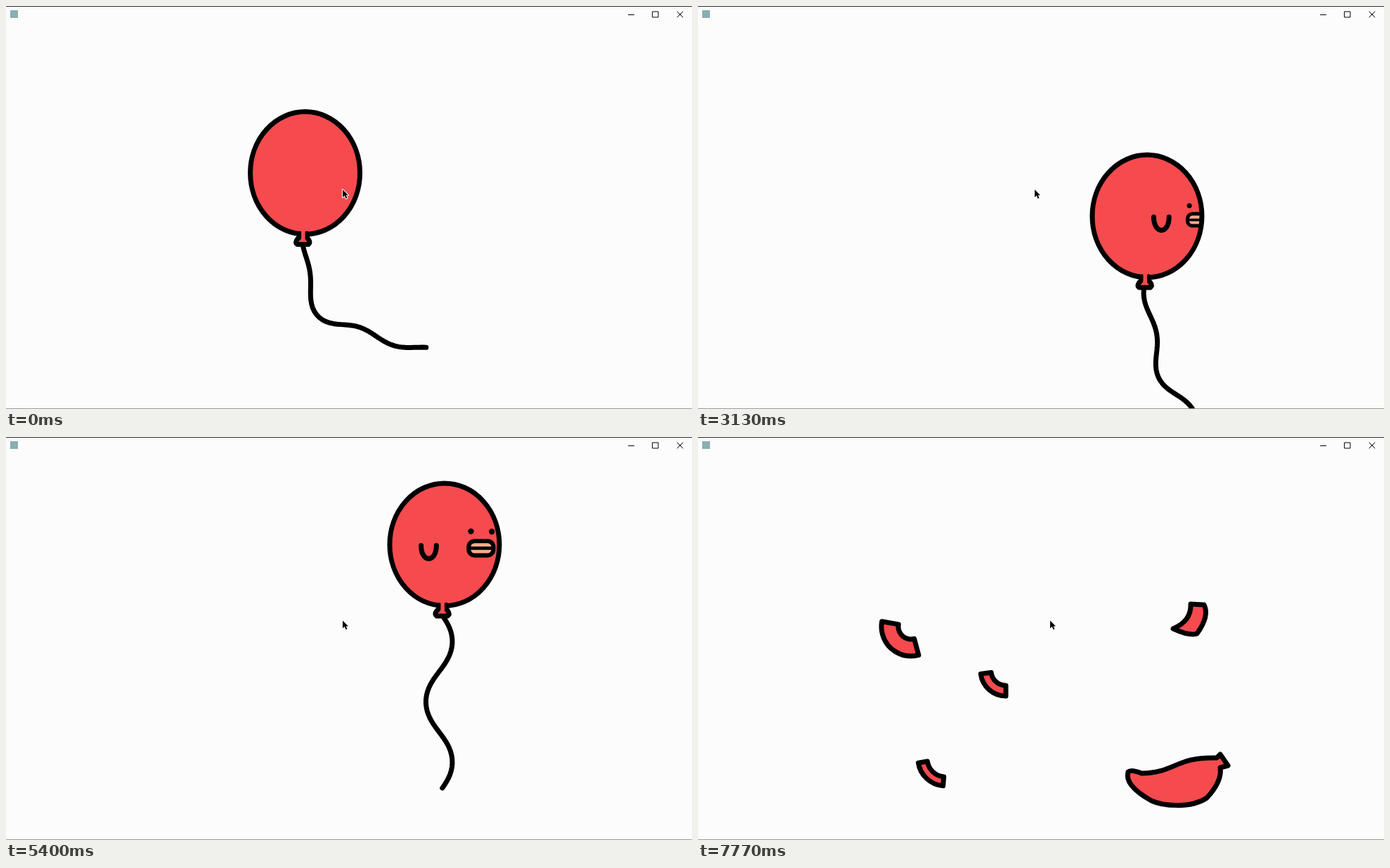
Recreate the animation shown at these times as an HTML page with a canvas. Size 976 by 574 pixels, loop 7.8 s.

```html
<!DOCTYPE html>
<html lang="en">
<head>
<meta charset="utf-8">
<title>Balloon</title>
<style>
html, body { margin: 0; width: 976px; height: 574px; overflow: hidden; background: #fcfcfc; }
canvas { display: block; }
</style>
</head>
<body>
<canvas id="stage" width="976" height="574"></canvas>
<script>
const ctx = document.getElementById('stage').getContext('2d');
const LOOP = 7800, POP = 7430, END = 7770;
const RED = '#f54b4f', PEACH = '#f8ad8c';
const STALLS = [[2430, 2570], [5730, 5830], [7330, 7430]];
const STRING_LENGTH = 268, STRING_STEPS = 48, WING = 71;

// String poses: the heading, in degrees from straight down, bends and waves along the length
const TRAIL = { x: -3, bend: 74, amp: 18, waves: 2.27, phase: 0.136 };
const HANG = { x: -6, bend: -3, amp: 30, waves: 1.96, phase: 0.43 };
const SWAY = { x: -1, bend: 0, amp: 37, waves: 1.4, phase: -0.06 };
const SWAY_BACK = { ...SWAY, x: -6, amp: -37 };

const KEYS = [
  { t: 0, dist: 0, turn: 180, pose: TRAIL },
  { t: 1070, dist: 69, turn: 33, pose: SWAY_BACK },
  { t: 2230, dist: 153, turn: -180, pose: TRAIL },
  { t: 3930, dist: 267, turn: -360, pose: HANG },
  { t: 5400, dist: 359.5, turn: -675, pose: SWAY },
  { t: 6470, dist: 436, turn: -720, pose: HANG },
  { t: POP, dist: 499, turn: -850, pose: SWAY_BACK }
];

const KNOT = new Path2D('M-8,87Q-7,92 -11,95Q-15,100 -11,102.5H4.5Q8,100 4.5,95Q1,92 2.5,87');
const ARROW = new Path2D('M0,0V11L2.6,8.6L4.6,12.8L6.5,12L4.6,8H8Z');

const SCRAPS = [
  { x: 303, y: 270, path: band(18, 42, 75, 190) },
  { x: 438, y: 333, path: band(21, 36, 90, 173) },
  { x: 352, y: 458, path: band(26, 39, 95, 171) },
  { x: 700, y: 260, path: new Path2D('M1,-22L20,-21Q28,-5 10,20Q0,24 -24,13Q2,2 1,-22Z') },
  { x: 682, y: 490, path: new Path2D('M-70,-13Q-66,-17 -51,-11C-2,-12 -2,-35 56,-33' +
    'L61,-38L72,-22L61,-19Q64,0 42,24C18,40 -22,35 -37,28Q-76,6 -70,-13Z') }
];

function rad(deg) { return deg * Math.PI / 180; }
function clamp(v, lo, hi) { return Math.min(hi, Math.max(lo, v)); }
function mix(a, b, u) { return a + (b - a) * u; }
function smooth(u) { u = clamp(u, 0, 1); return u * u * (3 - 2 * u); }

// Reflects a growing value between two walls
function fold(v, lo, hi) {
  const w = hi - lo;
  return hi - Math.abs((v - lo) % (2 * w) - w);
}

// Curved strip between two radii
function band(inner, outer, from, to) {
  const path = new Path2D();
  path.arc(0, 0, outer, rad(from), rad(to));
  path.arc(0, 0, inner, rad(to), rad(from), true);
  path.closePath();
  return path;
}

function ink(path, fill, width = 7) {
  if (fill) { ctx.fillStyle = fill; ctx.fill(path); }
  ctx.strokeStyle = '#000';
  ctx.lineWidth = width;
  ctx.stroke(path);
}

function dot(x, y, r) {
  ctx.fillStyle = '#000';
  ctx.beginPath();
  ctx.arc(x, y, r, 0, 7);
  ctx.fill();
}

function stateAt(t) {
  const i = Math.max(1, KEYS.findIndex(k => k.t >= t)), a = KEYS[i - 1], b = KEYS[i];
  const u = (t - a.t) / (b.t - a.t);
  const dist = mix(a.dist, b.dist, u), turn = mix(a.turn, b.turn, u);
  const pose = {};
  for (const p in a.pose) pose[p] = mix(a.pose[p], b.pose[p], u);
  return {
    x: fold(425.5 + dist, 81, 704.5),
    y: fold(237 + dist, 145.5, 374.5),
    turn: turn - 360 * Math.round(turn / 360),
    pose
  };
}

function drawString({ x, bend, amp, waves, phase }) {
  const path = new Path2D(), step = STRING_LENGTH / STRING_STEPS;
  let y = 105;
  path.moveTo(x, y);
  for (let i = 0; i < STRING_STEPS; i++) {
    const s = (i + 0.5) / STRING_STEPS;
    const heading = rad(bend * smooth((s - 0.1) / 0.5) + amp * Math.cos(rad(360 * (waves * s - phase))));
    path.lineTo(x += step * Math.sin(heading), y += step * Math.cos(heading));
  }
  ink(path);
}

function drawFace(turn) {
  const c = Math.cos(rad(turn)), s = Math.sin(rad(turn)), k = 0.75 + 0.25 * c;
  if (c < 0.05) return;
  ctx.save();
  ctx.translate(2.5 + 70 * s, 8.5 - 2.5 * Math.min(1, 2 * Math.abs(s)));
  ctx.scale(k, k);
  dot(-15.5, -26, 4.5);
  dot(16.5, -25.5, 4.5);
  const beak = new Path2D();
  beak.roundRect(-19, -11, 38, 22, 9);
  ink(beak, PEACH, 6.5);
  ink(new Path2D('M-18,0H18'), null, 5);
  ctx.restore();
}

function drawWing(x) {
  if (Math.abs(x) > WING + 12) return;
  x = clamp(x, -WING, WING);
  const edge = (x / WING) ** 3, bulge = Math.abs(edge);
  const half = 11 - 4 * bulge, low = 27 + 4 * bulge, lean = 3 * edge;
  const wing = new Path2D();
  wing.moveTo(x - half, 2);
  wing.bezierCurveTo(x - half + lean, low, x + half + lean, low, x + half, 2);
  ink(wing, RED);
}

function drawBalloon({ x, y, turn, pose }) {
  ctx.save();
  ctx.translate(x, y);
  drawString(pose);
  const body = new Path2D();
  body.ellipse(0, 0.8, 78, 87.3, 0, 0, 7);
  ctx.fillStyle = RED;
  ctx.fill(body);
  ctx.save();
  ctx.clip(body);
  drawFace(turn);
  ctx.restore();
  ink(body);
  drawWing(1.08 * turn - WING);
  drawWing(1.08 * turn + WING);
  ink(KNOT, RED);
  ctx.fillStyle = RED;
  ctx.fillRect(-5.5, 81, 5.5, 14);
  ctx.restore();
}

function drawScraps(t) {
  const from = stateAt(POP), u = clamp((t - POP) / (END - POP), 0, 1);
  const out = mix(0.3, 1, 1 - (1 - u) ** 2);
  SCRAPS.forEach(({ x, y, path }, i) => {
    ctx.save();
    ctx.translate(mix(from.x, x, out), mix(from.y, y, out) - 60 * u * (1 - u));
    ctx.rotate((i - 2) * 0.4 * (1 - u));
    ink(path, RED);
    ctx.restore();
  });
}

function drawWindow() {
  ctx.fillStyle = '#8aaeb2';
  ctx.fillRect(6, 6, 11, 11);
  ink(new Path2D('M885.5,12.5H893.5M920,8H928V16H920ZM955,8L963,16M963,8L955,16'), null, 1);
  ctx.fillStyle = '#2b2b2b';
  ctx.fillRect(0, 0, 976, 1);
  ctx.fillStyle = '#9a9a9a';
  ctx.fillRect(0, 573, 976, 1);
}

function drawCursor(t) {
  ctx.save();
  ctx.translate(479 + 22 * clamp((t - 7000) / 330, 0, 1), 261.5);
  ctx.strokeStyle = '#fff';
  ctx.lineWidth = 2;
  ctx.stroke(ARROW);
  ctx.fillStyle = '#000';
  ctx.fill(ARROW);
  ctx.restore();
}

function frame() {
  let t = performance.now() % LOOP;
  for (const [a, b] of STALLS) if (t > a && t < b) t = a;
  ctx.fillStyle = '#fcfcfc';
  ctx.fillRect(0, 0, 976, 574);
  ctx.lineCap = ctx.lineJoin = 'round';
  if (t < POP) drawBalloon(stateAt(t));
  else drawScraps(t);
  drawWindow();
  drawCursor(t);
  requestAnimationFrame(frame);
}
frame();
</script>
</body>
</html>
```
